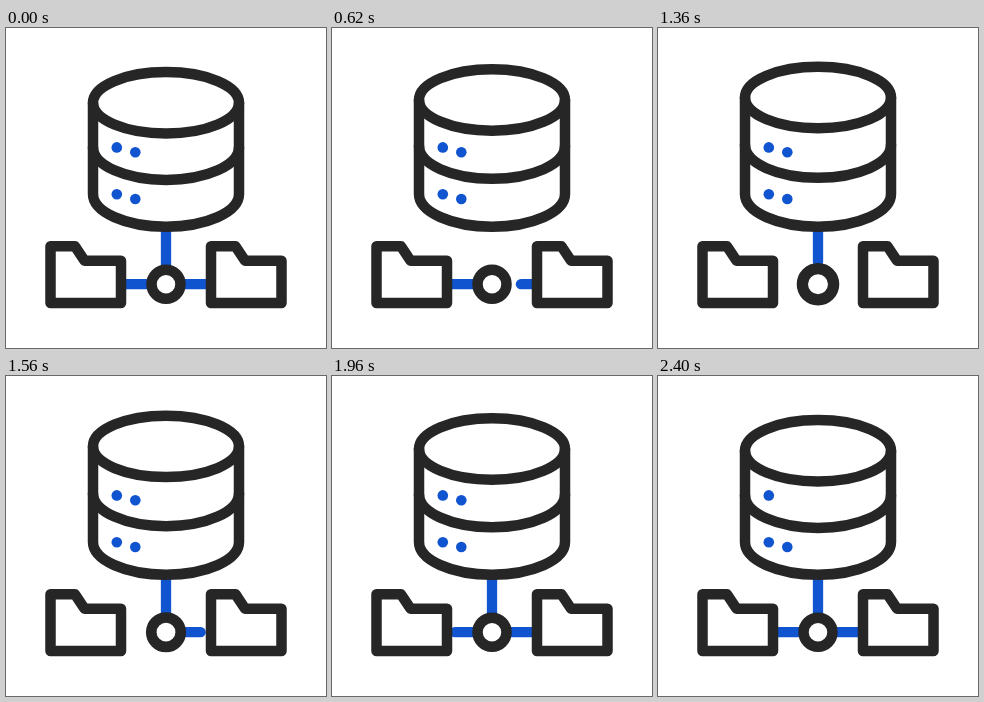
These frames come from a looping animation (320 px wide and 320 px high, 2420 ms). An HTML page:

```html
<!DOCTYPE html>
<html lang="en">
<head>
<meta charset="utf-8">
<title>Database sync</title>
<style>
  html, body { margin: 0; width: 100%; height: 100%; overflow: hidden; background: #fff; }
  svg { display: block; width: 100%; height: 100%; }
  .ink { fill: none; stroke: #262626; stroke-width: 10.5; stroke-linecap: round; stroke-linejoin: round; }
  .link { stroke: #1054d0; stroke-width: 10.3; stroke-linecap: round; }
  .dots { fill: #1054d0; }
</style>
</head>
<body>
<svg viewBox="0 0 320 320">
  <defs>
    <path id="folder" d="M44.5 275V218.3H69L78.5 232.7H115V275Z"/>
  </defs>
  <line id="down" class="link"/>
  <line id="right" class="link"/>
  <line id="left" class="link"/>
  <g class="ink">
    <path id="body"/>
    <path id="middle"/>
    <ellipse id="lid" cx="160" rx="73" ry="30.7"/>
    <circle id="ring" r="14.5" style="fill:#fff"/>
    <use id="folderL" href="#folder"/>
    <use id="folderR" href="#folder"/>
  </g>
  <g class="dots">
    <circle cx="110.8" cy="119.4" r="5.3"/>
    <circle id="blink" cx="129.3" cy="124.2" r="5.3"/>
    <circle cx="110.8" cy="166.2" r="5.3"/>
    <circle cx="129.3" cy="171" r="5.3"/>
  </g>
</svg>
<script>
const LOOP = 2420;
const $ = id => document.getElementById(id);
const set = (id, attrs) => {
  for (const k in attrs) $(id).setAttribute(k, attrs[k]);
};
const ramp = (t, a, b) => Math.min(1, Math.max(0, (t - a) / (b - a)));
const ease = p => p * p * (3 - 2 * p);
const pulse = (t, start) => Math.sin(Math.PI * ramp(t, start, start + 420)) ** 2;

// Each link is wiped from its first end, then redrawn from there.
const links = [
  { id: 'down', from: [160, 200], to: [160, 240], wipe: [120, 560], draw: [1060, 1460] },
  { id: 'right', from: [178, 256.2], to: [203.5, 256.2], wipe: [440, 840], draw: [1380, 1680] },
  { id: 'left', from: [142, 256.2], to: [116.5, 256.2], wipe: [610, 1010], draw: [1690, 2090] }
];

function drawLink({ id, from, to, wipe, draw }, t) {
  const redraw = t >= draw[0];
  const a = redraw ? 0 : ease(ramp(t, ...wipe));
  const b = redraw ? ease(ramp(t, ...draw)) : 1;
  const at = (i, p) => from[i] + (to[i] - from[i]) * p;
  set(id, {
    x1: at(0, a), y1: at(1, a), x2: at(0, b), y2: at(1, b),
    visibility: b - a > 0.001 ? 'visible' : 'hidden'
  });
}

function render(t) {
  const lift = 2.75 * (1 - Math.cos(2 * Math.PI * t / LOOP));
  const top = 74.8 - lift;
  const mid = 119.2 - lift * 0.4;
  const arc = 'A73 32.7 0 0 0 233 ';
  set('lid', { cy: top });
  set('middle', { d: `M87 ${mid}${arc}${mid}` });
  set('body', { d: `M87 ${top}V166${arc}166V${top}` });
  links.forEach(link => drawLink(link, t));
  set('ring', { transform: `translate(160 256.2) scale(${1 + 0.09 * pulse(t, 1200)})` });
  set('folderR', { transform: `translate(160.5 ${-7.5 * pulse(t, 1550)})` });
  set('folderL', { transform: `translate(0 ${-7.5 * pulse(t, 1960)})` });
  set('blink', { visibility: t >= 2340 ? 'hidden' : 'visible' });
}

const begin = performance.now();
function tick() {
  render((performance.now() - begin) % LOOP);
  requestAnimationFrame(tick);
}
render(0);
requestAnimationFrame(tick);
</script>
</body>
</html>
```
